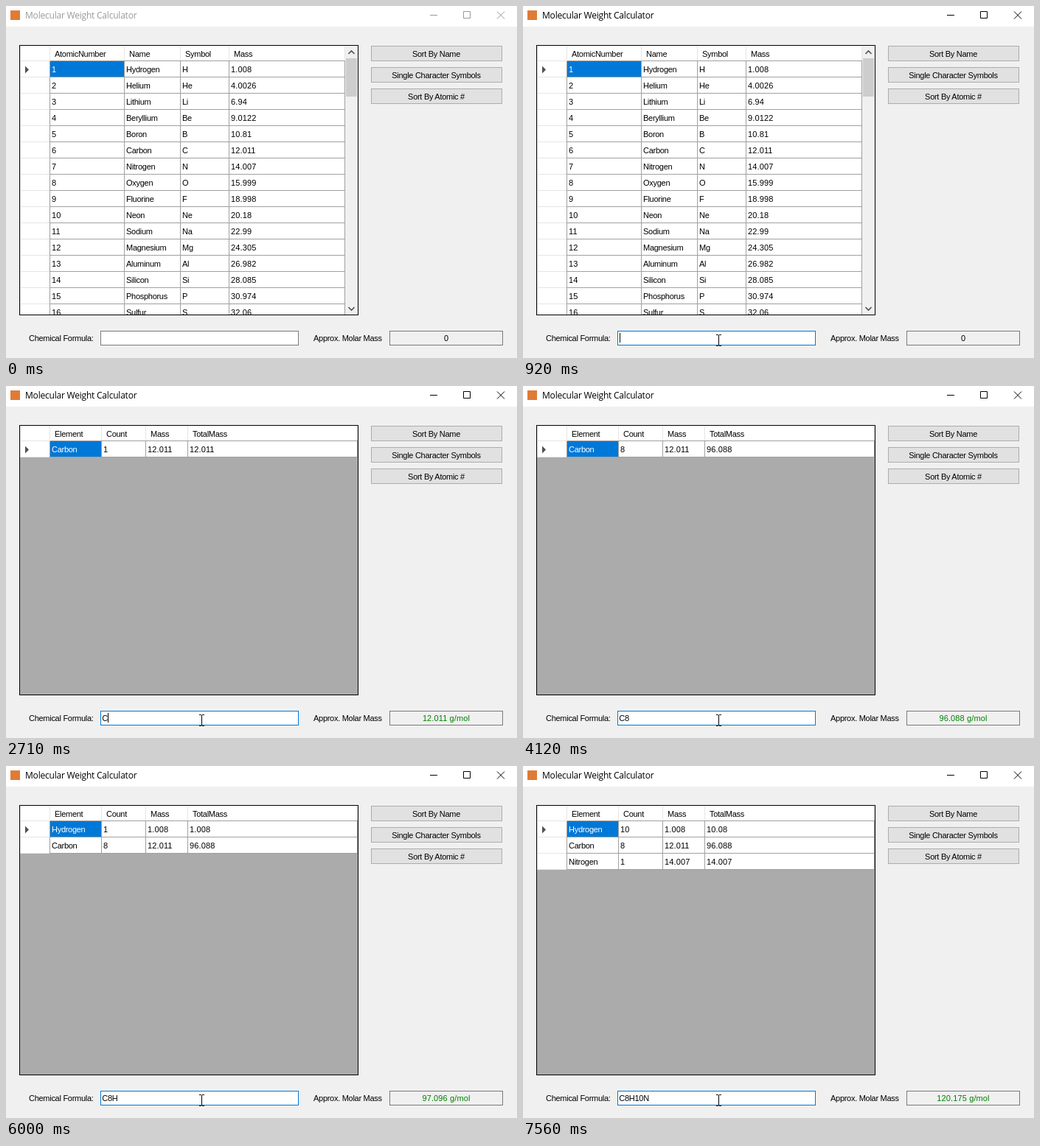
These frames come from a looping animation (693 by 478 pixels, 8 s). An HTML page:

```html
<!DOCTYPE html>
<html lang="en">
<head>
<meta charset="utf-8">
<title>Molecular Weight Calculator</title>
<style>
  html, body { margin: 0; width: 100%; height: 100%; overflow: hidden; background: #f0f0f0; }
  svg { display: block; width: 100%; height: 100%; }
  text { font: 11px "Liberation Sans", Arial, sans-serif; letter-spacing: -.28px; white-space: pre; }
  .num { letter-spacing: .12px; }
  .title { font: 12px "Open Sans", "Noto Sans", sans-serif; letter-spacing: -.21px; }
  .mid { text-anchor: middle; }
</style>
</head>
<body>
<svg id="stage" viewBox="0 0 693 478" preserveAspectRatio="none">
  <rect width="693" height="478" fill="#f0f0f0"/>
  <rect width="693" height="28" fill="#fff"/>
  <rect x="6" y="6" width="13" height="13" fill="#df7b35"/>
  <text id="title" class="title" x="26" y="17">Molecular Weight Calculator</text>
  <g id="controls" fill="none">
    <path d="M575 12.5h10M620.5 7.5h9v9h-9z"/>
    <path d="M666 7.5l10 10M676 7.5l-10 10"/>
  </g>
  <clipPath id="inner"><rect x="19" y="54" width="458" height="365"/></clipPath>
  <rect x="18.5" y="53.5" width="459" height="366" fill="#ababab" stroke="#000"/>
  <g id="grid" clip-path="url(#inner)"></g>
  <g id="buttons"></g>
  <text x="31" y="455">Chemical Formula:</text>
  <rect id="box" x="128.5" y="441.5" width="268" height="19" fill="#fff"/>
  <text id="formula" x="130.3" y="455"></text>
  <rect id="caret" y="444" width="1" height="13"/>
  <text x="417" y="455">Approx. Molar Mass</text>
  <rect x="520.5" y="441.5" width="153" height="19" fill="#f0f0f0" stroke="#7a7a7a"/>
  <text id="total" class="num mid" x="597" y="455"></text>
  <path id="pointer" fill="none" stroke="#000"
    d="M-3.5 -7.5h3M.5 -7.5h3M0 -7v14M-3.5 7.5h3M.5 7.5h3"/>
</svg>
<script>
const LOOP = 8000;
const DARK = '#a0a0a0', LIGHT = '#e5e5e5', BLUE = '#0078d7';
const $ = id => document.getElementById(id);

const elements = `Hydrogen H 1.008,Helium He 4.0026,Lithium Li 6.94,Beryllium Be 9.0122,
Boron B 10.81,Carbon C 12.011,Nitrogen N 14.007,Oxygen O 15.999,Fluorine F 18.998,
Neon Ne 20.18,Sodium Na 22.99,Magnesium Mg 24.305,Aluminum Al 26.982,Silicon Si 28.085,
Phosphorus P 30.974,Sulfur S 32.06`.split(',').map((line, i) => {
  const [name, symbol, mass] = line.trim().split(' ');
  return { number: i + 1, name, symbol, mass: +mass };
});

const typed = [[0, ''], [2710, 'C'], [3570, 'C8'], [4440, 'C8H'], [6230, 'C8H1'], [6310, 'C8H10'], [7090, 'C8H10N']];
const caretOn = [[920, 1460], [2010, 2480], [2710, 3260], [3570, 4120], [4440, 4980],
  [5450, 6000], [6230, 6860], [7090, 7560]];

const rect = (x, y, w, h, fill) => `<rect x="${x}" y="${y}" width="${w}" height="${h}" fill="${fill}"/>`;
const label = (x, y, s, fill = '#000') =>
  `<text x="${x}" y="${y}" fill="${fill}"${/^\d/.test(s) ? ' class="num"' : ''}>${s}</text>`;

// edges: the vertical grid lines, the last one closing the table
function table(heads, edges, rows) {
  const right = edges[edges.length - 1];
  let out = rect(19, 54, right - 18, 21, '#fff');
  heads.forEach((h, i) => {
    out += rect(edges[i], 54, 1, 20, LIGHT) + label(edges[i] + 7, 69, h);
  });
  out += rect(right, 54, 1, 20, LIGHT) + rect(19, 74, 41, 1, LIGHT) + rect(60, 74, right - 59, 1, DARK);
  rows.forEach((row, r) => {
    const y = 75 + 22 * r;
    out += rect(19, y, right - 18, 22, '#fff')
      + rect(19, y + 21, 41, 1, LIGHT) + rect(60, y + 21, right - 59, 1, DARK);
    edges.forEach(x => out += rect(x, y, 1, 22, DARK));
    row.forEach((cell, c) => {
      const picked = !r && !c;
      if (picked) out += rect(60, y, edges[1] - 60, 21, BLUE);
      out += label(edges[c] + 3, y + 15, cell, picked ? '#fff' : '#000');
    });
  });
  return out + rect(19, 54, 1, 21 + 22 * rows.length, LIGHT)
    + '<path d="M26 81.5l5 5-5 5z" fill="#505050"/>';
}

const scrollbar = rect(460, 54, 17, 365, '#f0f0f0') + rect(461, 71, 15, 52, '#cdcdcd')
  + '<path d="M464.5 65l4-4 4 4M464.5 409l4 4 4-4" fill="none" stroke="#505050" stroke-width="1.6"/>';

function parse(formula) {
  const counts = {};
  for (const [, symbol, n] of formula.matchAll(/([A-Z][a-z]?)(\d*)/g))
    counts[symbol] = (counts[symbol] || 0) + (+n || 1);
  return elements.filter(e => counts[e.symbol]).map(e => ({ ...e, count: counts[e.symbol] }));
}

const round = x => String(+x.toFixed(3));

let shown = null;
function showFormula(formula) {
  if (formula === shown) return;
  shown = formula;
  const parts = parse(formula);
  $('formula').textContent = formula;
  $('grid').innerHTML = parts.length
    ? table(['Element', 'Count', 'Mass', 'TotalMass'], [59, 129, 189, 246, 476],
        parts.map(p => [p.name, p.count, p.mass, round(p.count * p.mass)]))
    : table(['AtomicNumber', 'Name', 'Symbol', 'Mass'], [59, 160, 236, 302, 459],
        elements.map(e => [e.number, e.name, e.symbol, e.mass])) + scrollbar;
  const sum = parts.reduce((s, p) => s + p.count * p.mass, 0);
  $('total').textContent = parts.length ? round(sum) + ' g/mol' : '0';
  $('total').setAttribute('fill', parts.length ? '#008000' : '#000');
  const width = [...formula].reduce((w, ch) => w + (ch === 'C' ? 7 : /\d/.test(ch) ? 6 : 8), 0);
  $('caret').setAttribute('x', 131 + width);
}

function draw(t) {
  showFormula(typed.filter(k => k[0] <= t).pop()[1]);
  $('caret').style.display = caretOn.some(([a, b]) => t >= a && t < b) ? '' : 'none';

  const active = t >= 770;
  $('title').setAttribute('fill', active ? '#000' : '#999');
  $('controls').setAttribute('stroke', active ? '#000' : '#999');
  $('box').setAttribute('stroke', active ? BLUE : t >= 610 ? '#171717' : '#7a7a7a');

  // the pointer enters from below in coarse steps
  const step = Math.floor((t - 450) / 78.4);
  const left = 1 - Math.min(1, Math.max(0, (step + 1) / 4));
  $('pointer').style.display = t < 450 ? 'none' : '';
  $('pointer').setAttribute('transform', `translate(${265.5 + Math.round(8 * left)} ${454 + Math.round(28 * left * left)})`);
}

$('buttons').innerHTML = ['Sort By Name', 'Single Character Symbols', 'Sort By Atomic #'].map((s, i) => {
  const y = 54 + 29 * i;
  return `<rect x="495.5" y="${y + .5}" width="177" height="20" fill="#e1e1e1" stroke="#adadad"/>
    <text class="mid" x="583.5" y="${y + 15}">${s}</text>`;
}).join('');

const start = performance.now();
function tick() {
  draw((performance.now() - start) % LOOP);
  requestAnimationFrame(tick);
}
tick();
</script>
</body>
</html>
```
